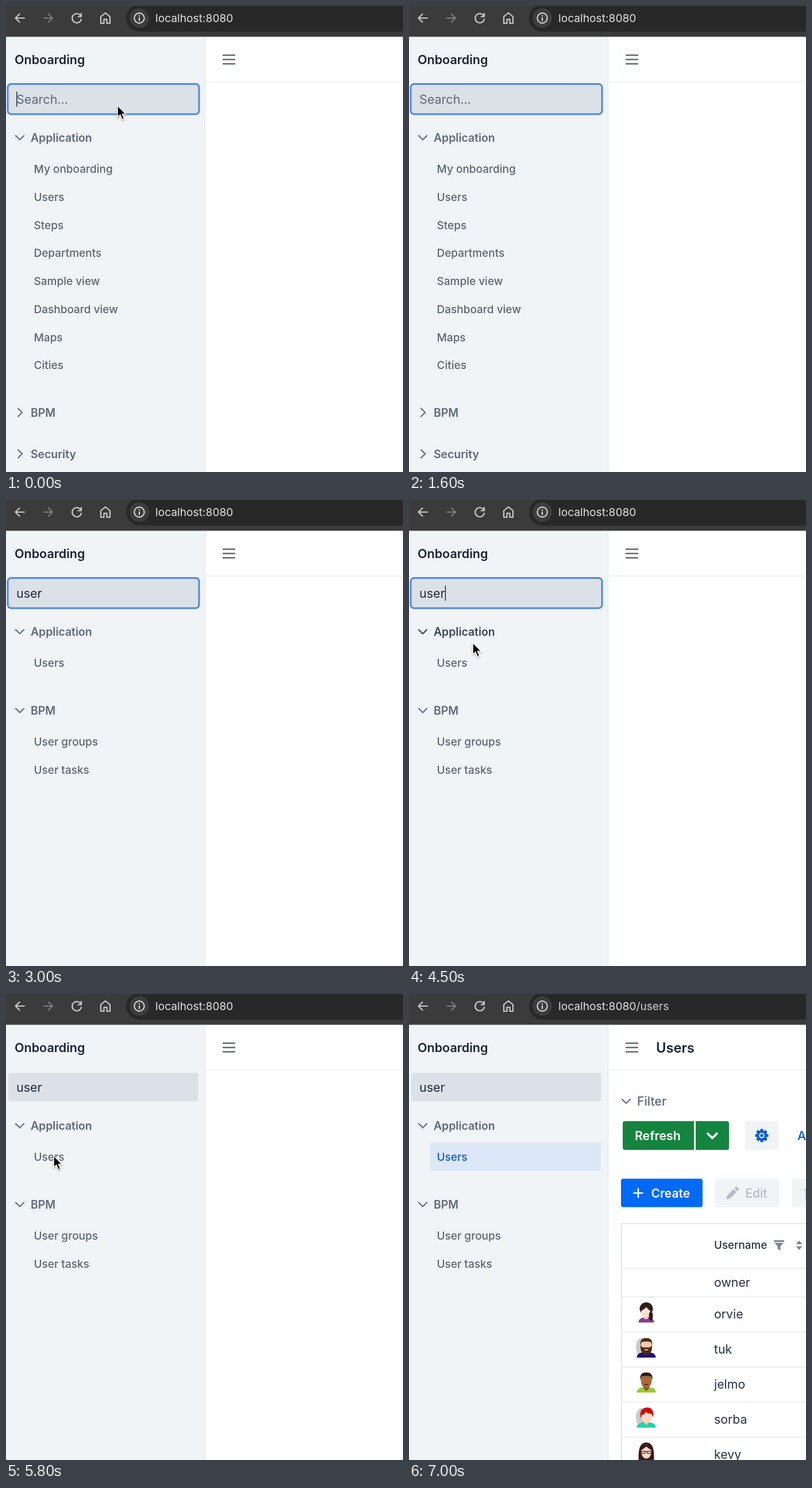
An HTML page for the animation above (7.4 s loop, 691x810 px).

```html
<!DOCTYPE html>
<html lang="en">
<head>
<meta charset="utf-8">
<title>Onboarding menu search</title>
<style>
  html, body { margin: 0; width: 100%; height: 100%; overflow: hidden; background: #fff; }
  svg { display: block; width: 691px; height: 810px; font-family: Inter, "Open Sans", sans-serif; }
  text { white-space: pre; }
  .line { fill: none; stroke-linecap: round; stroke-linejoin: round; }
</style>
</head>
<body>
<svg id="stage" viewBox="0 0 691 810" xmlns="http://www.w3.org/2000/svg"></svg>
<script>
const LOOP = 7400;
const SLATE = '#5f687a', INK = '#1a2333', BLUE = '#0b5bd3', PALE = '#f1f4f6';

const text = (x, y, size, weight, fill, str, id = '') =>
  `<text ${id && `id="${id}"`} x="${x}" y="${y}" font-size="${size}" font-weight="${weight}" fill="${fill}">${str}</text>`;
const rect = (x, y, w, h, fill, r = 0, extra = '') =>
  `<rect x="${x}" y="${y}" width="${w}" height="${h}" rx="${r}" fill="${fill}" ${extra}/>`;
const line = (d, stroke, width) =>
  `<path class="line" d="${d}" stroke="${stroke}" stroke-width="${width}"/>`;
const shape = (d, fill) => `<path d="${d}" fill="${fill}"/>`;
const oval = (x, y, rx, ry, fill) => `<ellipse cx="${x}" cy="${y}" rx="${rx}" ry="${ry}" fill="${fill}"/>`;
const group = (id, content) => `<g id="${id}">${content}</g>`;

const menuItem = (label, y) => text(48.5, y, 19, 500, '#5c6472', label);
const menuGroup = (label, y, open) =>
  line(open ? `M17 ${y - 10.5}l7 7 7-7` : `M21 ${y - 14.5}l7 7-7 7`, '#6b7484', 2.4) +
  text(43, y, 19.4, 600, SLATE, label);

function toolbar() {
  const icon = '#c9c9c9';
  return rect(0, 0, 691, 53.5, '#3b3b3b') +
    rect(209, -2.5, 520, 47, '#282828', 23.5) +
    line('M32 21H17M23.5 14l-7 7 7 7', icon, 2.2) +
    line('M66 21H80M74 14l7 7-7 7', '#7d7d7d', 2.2) +
    line('M130 17A8 8 0 1 0 131 23M131 13v5.5h-5.5', icon, 2.2) +
    line('M165 18.5l8-6.5 8 6.5V30h-5.5v-7h-5v7H165z', icon, 2.2) +
    oval(232, 21, 17, 17, '#3d3d3d') +
    `<circle cx="232" cy="21" r="8.7" fill="none" stroke="#e3e3e3" stroke-width="1.9"/>` +
    rect(231, 20, 2, 6, '#e3e3e3') + rect(231, 16, 2, 2.2, '#e3e3e3') +
    text(260, 27.5, 19.2, 400, '#e3e3e3', 'localhost:8080<tspan id="path" fill="#cfcfcf">/users</tspan>');
}

function sidebar() {
  const all = ['My onboarding', 'Users', 'Steps', 'Departments', 'Sample view', 'Dashboard view', 'Maps', 'Cities'];
  return rect(0, 53.5, 346, 757, PALE) + rect(346, 53.5, 1, 757, '#e0e4e9') +
    text(15, 101, 21.5, 600, INK, 'Onboarding') +
    rect(4, 137, 330.5, 49.5, '#dce0e7', 4) +
    group('ring', rect(3, 135.5, 333, 52.5, 'none', 6, 'stroke="#4b87e9" stroke-width="3"')) +
    text(18, 170, 21.5, 400, '#5f6877', 'Search...', 'hint') +
    text(18, 170, 21.5, 400, '#202a3b', '', 'typed') +
    rect(0, 149, 1.4, 26, INK, 0, 'id="caret"') +
    group('appHead', menuGroup('Application', 236, true)) +
    group('full', all.map((label, i) => menuItem(label, 290 + i * 48.75)).join('') +
      menuGroup('BPM', 714, false) + menuGroup('Security', 786, false)) +
    group('filtered', rect(37, 258.5, 297, 49, '#dce7f7', 0, 'id="active"') +
      group('usersItem', menuItem('Users', 290)) + menuGroup('BPM', 373, true) +
      menuItem('User groups', 427) + menuItem('User tasks', 476));
}

// Small portraits, centred on x = 0 with the top of the hair at y = 0.
const shirt = (half, fill) => shape(`M${-half} 35q0-7 8-8.5l5-1.5h${2 * half - 26}l5 1.5q8 1.500 8 8.500z`, fill);
const shade = oval(-8, 17, 10, 16, '#cacaca');
const portraits = [
  oval(0, 11, 11.5, 11, '#2d1d1f') + shirt(13.5, '#8b3d93') + rect(-4, 20, 7, 9, '#efc9b2') +
    oval(-1, 16, 8, 10, '#fae0d1') + shape('M-10 15Q-8 4 0 5Q9 6 10 16Q3 13 0 8Q-4 13-10 15z', '#2d1d1f') +
    oval(8, 24, 3.500, 8, '#2d1d1f'),
  shade + shirt(16.5, '#1c1266') + rect(-4, 22, 8, 7, '#e2ad84') + oval(0, 14, 9.5, 13, '#f3cda9') +
    shape('M-10 14Q-12 1 0 1Q12 1 10 14L8 8Q0 6-8 8z', '#4d2a1a') +
    shape('M-10 13Q-7 19 0 17Q7 19 10 13Q11 29 0 30Q-11 29-10 13z', '#4d2a1a') + oval(0, 21.5, 3.5, 1.2, '#f0b9a0'),
  shirt(16.500, '#98cc2f') + shape('M-5 21h10v6l-5 6-5-6z', '#8d542c') + oval(0, 14, 9.5, 13, '#a8693a') +
    shape('M-10.500 13Q-12 0 0 0Q12 0 10.500 13L8 7Q0 5-8 7z', '#2b1d18') + line('M-3 21h6', '#4a2615', 1.6),
  shade + shirt(16.5, '#21d3a3') + shape('M-4 21h8v6l-4 4-4-4z', '#f0bd9d') + oval(1, 15, 9, 12, '#fcd9c3') +
    shape('M-10 19Q-13 2 0 0Q14-1 12 17L9 11Q2 11-1 7Q-3 13-8 13z', '#d20a0a'),
  shape('M-13 34Q-16 0 0 0Q16 0 13 34z', '#3a1919') + oval(0, 16, 9, 12, '#fbdcc9') +
    shape('M-10 14Q-8 3 0 4Q8 3 10 14Q3 10 0 7Q-3 10-10 14z', '#3a1919') +
    line('M-8 15h6v4h-6zM2 15h6v4H2zM-2 16h4', '#6a2226', 1.2)
];

function usersPage() {
  const names = ['owner', 'orvie', 'tuk', 'jelmo', 'sorba', 'kevy'];
  const grey = '#b6bcc5', border = '#d5d9df';
  const cog = Array.from({ length: 8 }, (_, i) =>
    `<rect x="-2.6" y="-11.500" width="5.2" height="6" rx="1" transform="rotate(${i * 45})"/>`).join('');
  const rows = names.map((name, i) =>
    text(531, i ? 564 + (i - 1) * 60.9 : 509, 21.3, 400, '#283040', name) +
    rect(369, i ? 526 + (i - 1) * 60.9 : 476, 322, 1, '#dde1e6') +
    (i ? `<g transform="translate(413 ${536 + (i - 1) * 60.9})">${portraits[i - 1]}</g>` : '')).join('');
  return text(430, 102, 23.7, 600, INK, 'Users') +
    line('M371 183l7 7 7-7', '#6b7484', 2.4) + text(397, 193.5, 21.2, 500, SLATE, 'Filter') +
    rect(372, 221, 185, 50, '#15843f', 4) + rect(496, 221, 3, 50, '#fff') +
    text(393, 254, 21.3, 600, '#fff', 'Refresh') + line('M520 242.5l8 8 8-8', '#fff', 3.8) +
    rect(585, 221, 58, 50, PALE, 4) +
    `<g transform="translate(614 246)" fill="${BLUE}">${cog}<circle r="6.8" fill="none" stroke="${BLUE}" stroke-width="4"/>` +
    `<circle r="2.8"/></g>` +
    text(676, 254, 21.3, 500, BLUE, 'A') +
    rect(369, 321, 142, 49.500, '#0069f5', 4) + line('M399 338.5v15M391.5 346h15', '#fff', 2.6) +
    text(421.5, 353.500, 21, 600, '#fff', 'Create') +
    rect(533, 321, 112, 49.500, PALE, 4) +
    shape('M552 357l2-7 11-11 5 5-11 11zM566.500 337.500l2-2q1.500-1 3 .5l2 2q1 1.500 0 3l-2 2z', grey) +
    text(585.500, 353.500, 20.8, 500, grey, 'Edit') +
    rect(667, 321, 40, 49.500, PALE, 4) + rect(688, 339, 8, 2.5, grey) + rect(690, 343, 8, 13, grey) +
    rect(369, 398.500, 322, 1.2, border) + rect(369, 398.500, 1.2, 412, border) +
    text(531, 443, 18.8, 500, '#283040', 'Username') +
    shape('M635 428h18v3h-18zM636 432.500h16l-5.500 6v7.500l-5-3v-4.500z', '#7d8696') +
    shape('M673.500 435l5.500-6.500 5.500 6.500zM673.500 438.500l5.500 6.500 5.500-6.500z', '#7d8696') + rows;
}

const arrow = '<path d="M0 0V20.500L4.700 16.300 8.100 24.300 11.800 22.700 8.400 15H14.700Z" stroke="#fff" stroke-width="1.500"/>';
const hand = '<path transform="translate(0 -1)" d="M-3 2Q0-1 2 3L4 9Q7 7 8 10Q11 8 12 11Q15 10 15 14L14 20 12 23H2Q0 18-6 14Q-7 10-2 12L0 13Z" ' +
  'fill="#fff" stroke="#000" stroke-width="1.600" stroke-linejoin="round"/><path d="M4.500 14v5M8 14v5M11 14v5" stroke="#000"/>';

const stage = document.getElementById('stage');
stage.innerHTML = '<filter id="soft" x="-50%" y="-50%" width="200%" height="200%">' +
  '<feDropShadow dx="0" dy="1.5" stdDeviation="1.3" flood-opacity=".4"/></filter>' +
  rect(0, 0, 691, 810, '#fff') + sidebar() + rect(347, 131.5, 344, 1, '#e3e6ea') +
  line('M378 85.500h20M378 93h20M378 100.500h20', SLATE, 2.5) +
  group('page', usersPage()) + toolbar() +
  `<g id="cursor" filter="url(#soft)">${group('arrow', arrow)}${group('hand', hand)}</g>`;

const el = id => document.getElementById(id);
const show = (id, on) => el(id).setAttribute('visibility', on ? 'inherit' : 'hidden');

// Pointer stops: time, x, y. The pointer is hidden between the runs.
const runs = [
  [[0, 194, 173], [100, 194, 173], [600, 188, 170], [700, 188, 170], [1100, 166, 168], [1500, 166, 168]],
  [[3900, 119, 397], [4200, 119, 397], [4400, 122, 290], [4500, 111, 248], [4600, 108, 249],
   [5000, 88, 278], [5200, 83, 281], [6400, 83, 281], [6500, 76, 262], [6600, 110, 280],
   [6700, 230, 380], [6800, 400, 560], [6900, 590, 779]]
];

function pointerAt(t) {
  const run = runs.find(r => t >= r[0][0] && t <= r[r.length - 1][0]);
  if (!run) return null;
  const i = Math.max(1, run.findIndex(stop => stop[0] >= t));
  const [t0, x0, y0] = run[i - 1], [t1, x1, y1] = run[i];
  const k = (t - t0) / (t1 - t0);
  return { x: x0 + (x1 - x0) * k, y: y0 + (y1 - y0) * k };
}

function draw(t) {
  const typedCount = t < 1700 ? 0 : Math.min(4, 1 + Math.floor((t - 1700) / 200));
  const filtered = t >= 2800, focused = t < 5200, opened = t >= 5900;
  const typing = t >= 1700 && t < 2300;
  const blinkOn = (t + (t < 1700 ? 100 : 700)) % 1000 < 500;

  el('typed').textContent = 'user'.slice(0, typedCount);
  el('caret').setAttribute('x', typedCount ? 18 + el('typed').getComputedTextLength() : 18);
  show('hint', !typedCount);
  show('caret', focused && (typing || blinkOn));
  show('ring', focused);
  show('full', !filtered);
  show('filtered', filtered);
  show('active', filtered && opened);
  show('page', opened);
  show('path', opened);
  el('usersItem').firstChild.setAttribute('fill', opened ? BLUE : '#5c6472');

  const p = pointerAt(t);
  const overHead = p && t > 4000 && p.y > 205 && p.y < 254;
  const [chevron, label] = el('appHead').children;
  chevron.setAttribute('stroke', overHead ? '#414a5b' : '#6b7484');
  label.setAttribute('fill', overHead ? '#3c4557' : SLATE);

  show('cursor', p);
  if (p) {
    const overItem = opened && p.x < 334 && p.y > 258 && p.y < 308;
    el('cursor').setAttribute('transform', `translate(${p.x} ${p.y})`);
    show('arrow', !overItem);
    show('hand', overItem);
  }
}

function tick() {
  draw(Math.floor(performance.now() % LOOP / 100) * 100);
  requestAnimationFrame(tick);
}
tick();
</script>
</body>
</html>
```
